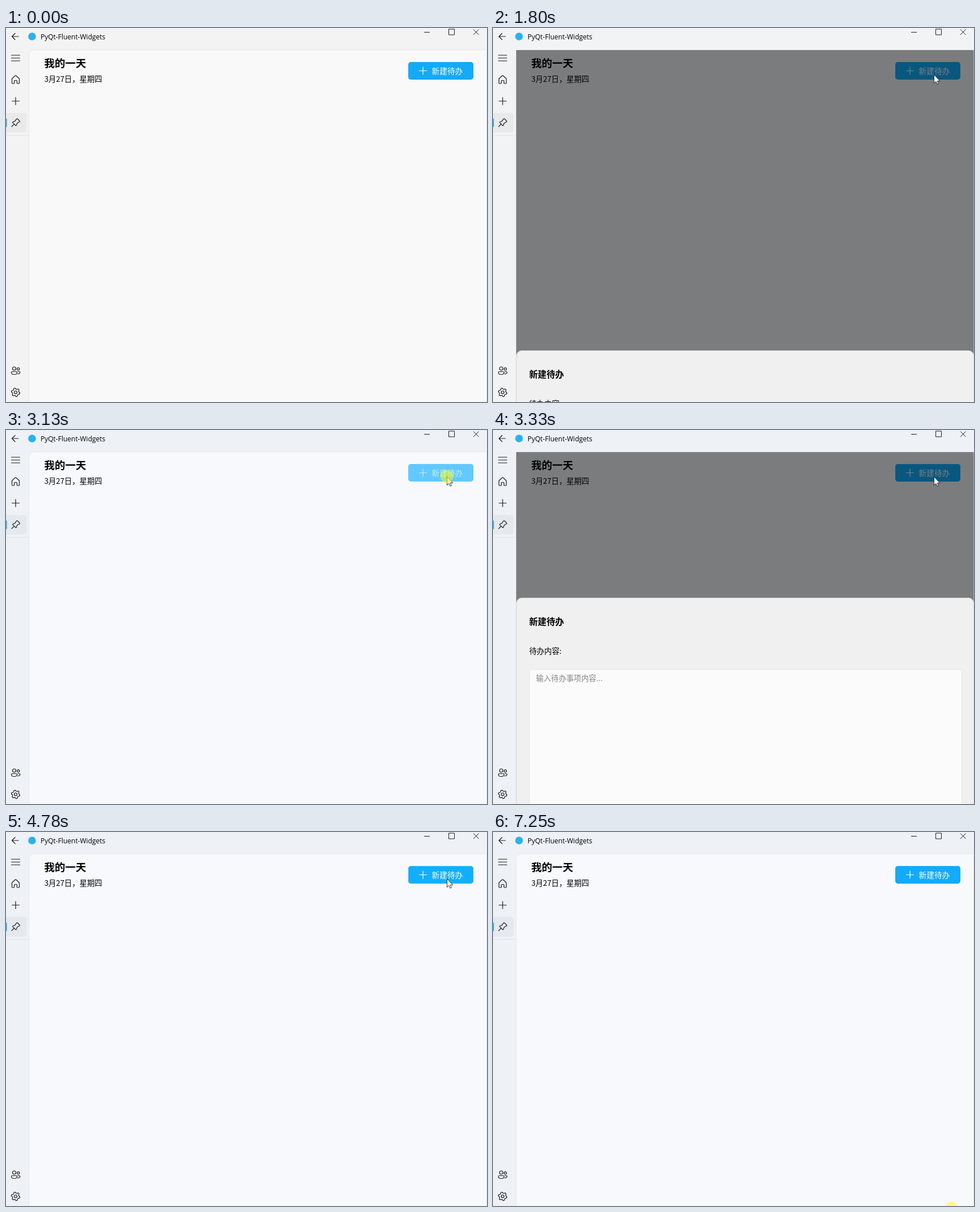
These frames come from a looping animation (849 px wide and 660 px high, 7310 ms). An HTML page:

```html
<!DOCTYPE html>
<html lang="zh-CN">
<head>
<meta charset="utf-8">
<title>PyQt-Fluent-Widgets</title>
<style>
  html, body { margin: 0; width: 100%; height: 100%; overflow: hidden; background: #f3f3f3; }
  svg { display: block; }
  text { font-family: "Noto Sans CJK SC", "Noto Sans CJK", sans-serif; font-size: 13.3px; }
  .caption { font-family: "Open Sans", "Noto Sans", sans-serif; font-size: 12px; }
  .bold { font-weight: 700; }
  .line { fill: none; stroke: #1a1a1a; stroke-width: 1.2; stroke-linecap: round; stroke-linejoin: round; }
  .sharp { stroke-width: 1; stroke-linecap: butt; stroke-linejoin: miter; }
</style>
</head>
<body>
<svg width="849" height="660" viewBox="0 0 849 660">
  <defs>
    <clipPath id="pageArea"><rect x="41" y="39" width="808" height="621"/></clipPath>
  </defs>

  <!-- window frame and navigation -->
  <rect id="frame" width="849" height="660"/>
  <path class="line" d="M22 15H10.5M16 9.5L10.5 15L16 20.5"/>
  <circle cx="46" cy="15" r="6.8" fill="#2bb1f0"/>
  <text class="caption" x="61" y="20">PyQt-Fluent-Widgets</text>
  <path class="line sharp" d="M738 7.5H748M781.5 2H791.5V12H781.5ZM825 2.5L834.5 12M834.5 2.5L825 12"/>

  <rect x="-6" y="150" width="42.5" height="34.5" rx="5" fill="#000" fill-opacity=".04"/>
  <rect x="-2" y="159.5" width="3.5" height="15.5" rx="1.5" fill="#12a8f5"/>
  <path d="M0 189.5H40" stroke="#000" stroke-opacity=".06"/>
  <g class="line">
    <path d="M9.5 48H24.5M9.5 53H24.5M9.5 58H24.5"/>
    <path d="M10.5 89.5L16 84.3Q17 83.5 18 84.3L23.5 89.5V97Q23.5 98 22.5 98H20.2Q19.4 98 19.4 97V93.5Q19.4 92.5 18.4 92.5H15.6Q14.6 92.5 14.6 93.5V97Q14.6 98 13.8 98H11.5Q10.5 98 10.5 97Z"/>
    <path d="M10.5 129H23.5M17 122.5V135.5"/>
    <path transform="translate(17 167)" d="M1.6-6.6Q2.6-7.4 3.5-6.5L6.9-3Q7.8-2 6.7-1.2L2.6 1.1L1.3 4.7Q.8 5.8-.2 5L-4.9 .3Q-5.8-.8-4.6-1.3L-1.1-2.6ZM-2.6 2.6L-7 7"/>
    <circle cx="14.5" cy="601" r="3"/>
    <circle cx="21.7" cy="601.7" r="2.1"/>
    <path d="M11 606.5H18Q19.5 606.5 19.5 608Q19.5 611.5 14.5 611.5Q9.5 611.5 9.5 608Q9.5 606.5 11 606.5ZM21 606.5H23.5Q24.8 606.5 24.8 607.8Q24.5 610.5 20.8 610.6"/>
    <path id="gear" transform="translate(17 643)"/>
    <circle cx="17" cy="643" r="2.5"/>
  </g>

  <!-- page -->
  <path id="page" d="M40.5 661V48.5Q40.5 38.5 50.5 38.5H848.5V661" stroke="#e5e6e8"/>
  <text class="bold" x="67.5" y="69.3" style="font-size:18.5px">我的一天</text>
  <text x="67.7" y="95.3">3月27日，星期四</text>
  <rect id="buttonEdge" x="710" y="60" width="115" height="31" rx="5"/>
  <rect id="buttonFace" x="710.5" y="60.5" width="114" height="29.5" rx="4.5"/>
  <g id="buttonLabel" fill="#fff">
    <path d="M729 75.5H743M736 68.5V82.5" stroke="#fff" stroke-width="1.2"/>
    <text x="751.5" y="81" style="font-size:13.7px">新建待办</text>
  </g>

  <!-- drawer -->
  <g id="drawer" clip-path="url(#pageArea)">
    <rect x="41" y="39" width="807.5" height="621" fill="#000" fill-opacity=".5"/>
    <g id="panel">
      <rect x="41.5" y=".5" width="807" height="640" rx="9" fill="#f0f0f0" stroke="#dcdcdc"/>
      <text class="bold" x="63.7" y="48.3" style="font-size:15.4px">新建待办</text>
      <text x="64" y="98.5">待办内容:</text>
      <rect x="64.5" y="126.5" width="763" height="540" rx="5" fill="#fbfbfb" stroke="#e6e6e6"/>
      <text x="76" y="147.3" fill="#858585">输入待办事项内容...</text>
    </g>
  </g>

  <!-- pointer -->
  <g id="pointer">
    <path d="M.5 .5V15.5L3.9 12.3L6 17.2L8.3 16.2L6.2 11.5H10.8Z" fill="#fff" stroke="#222" stroke-width=".9"/>
    <circle id="press" r="11.3" fill="#ff0" fill-opacity=".5"/>
  </g>
</svg>
<script>
const LOOP = 7310;
const parts = Object.fromEntries(
  [...document.querySelectorAll('[id]')].map(node => [node.id, node]));

// Bursts of movement: start, end, number of steps; the picture rests between them.
const bursts = [
  [0, 0, 1], [370, 510, 3], [910, 1590, 11], [1660, 2120, 8], [3130, 3530, 7],
  [4390, 4390, 1], [4520, 4780, 5], [5710, 5840, 3], [6040, 6590, 9], [6860, 7250, 6]
];
// Pointer stops: time, x, y.
const stops = [
  [370, 804, 516], [440, 768, 330], [510, 720, 158], [842, 720, 158], [1390, 778, 82],
  [5645, 778, 82], [5840, 820, 276], [5972, 820, 276], [6590, 788, 577],
  [6782, 788, 577], [7250, 809, 664]
];
const presses = [[1590, 1774], [3130, 3235], [4390, 4500], [7250, LOOP]];
const openings = [[1774.5, 2050], [3235.7, 3530], [4500, 4780]];
const PANEL_HEIGHT = 480, OPEN_TIME = 250;

const clamp = x => Math.min(1, Math.max(0, x));
const mix = (a, b, k) => a + (b - a) * k;
const mixColor = (a, b, k) => `rgb(${a.map((v, i) => mix(v, b[i], k))})`;
const spanAt = (spans, t) => spans.find(([from, to]) => t >= from && t < to);
const show = (node, on) => { node.style.display = on ? '' : 'none'; };

function steppedTime(t) {
  const [start, end, count] = bursts.findLast(b => b[0] <= t);
  const step = (end - start) / (count - 1) || 1;
  return Math.min(end, start + Math.floor((t - start) / step + 1e-6) * step);
}

function pointerAt(t) {
  const next = stops.findIndex(s => s[0] > t);
  if (next < 0) return stops.at(-1).slice(1);
  const a = stops[Math.max(0, next - 1)], b = stops[next];
  const k = clamp((t - a[0]) / (b[0] - a[0] || 1));
  return [mix(a[1], b[1], k), mix(a[2], b[2], k)];
}

function drawButton(hover, pressed) {
  const face = pressed ? '#62c9ff' : hover ? '#12afff' : '#14aafa';
  parts.buttonFace.setAttribute('fill', face);
  parts.buttonFace.setAttribute('stroke', hover && !pressed ? '#2db8ff' : face);
  parts.buttonEdge.setAttribute('fill', pressed ? face : '#0d85c2');
  parts.buttonLabel.setAttribute('opacity', pressed ? .65 : 1);
}

function draw(time) {
  const t = steppedTime(time);
  const tint = clamp((t - 1600) / 450);
  parts.frame.setAttribute('fill', mixColor([243, 243, 243], [238, 242, 247], tint));
  parts.page.setAttribute('fill', mixColor([249, 249, 249], [247, 249, 253], tint));

  const [x, y] = pointerAt(t);
  const pressed = !!spanAt(presses, t);
  const hover = t >= 370 && x >= 710 && x <= 825 && y >= 60 && y <= 91;
  show(parts.pointer, t >= 370);
  parts.pointer.setAttribute('transform', `translate(${x} ${y})`);
  show(parts.press, pressed);
  drawButton(hover, hover && pressed);

  const opening = spanAt(openings, t);
  show(parts.drawer, opening);
  if (opening) {
    const rise = 1 - (1 - clamp((t - opening[0]) / OPEN_TIME)) ** 3;
    parts.panel.setAttribute('transform', `translate(0 ${Math.round(660 - PANEL_HEIGHT * rise)})`);
  }
}

// Six-toothed settings wheel.
const teeth = Array.from({ length: 24 }, (_, i) => {
  const angle = (i + .5) * Math.PI / 12, r = i % 4 < 2 ? 7.6 : 5.8;
  return `${(r * Math.cos(angle)).toFixed(2)} ${(r * Math.sin(angle)).toFixed(2)}`;
});
parts.gear.setAttribute('d', `M${teeth.join('L')}Z`);

const begin = performance.now();
function tick() {
  draw((performance.now() - begin) % LOOP);
  requestAnimationFrame(tick);
}
tick();
</script>
</body>
</html>
```
